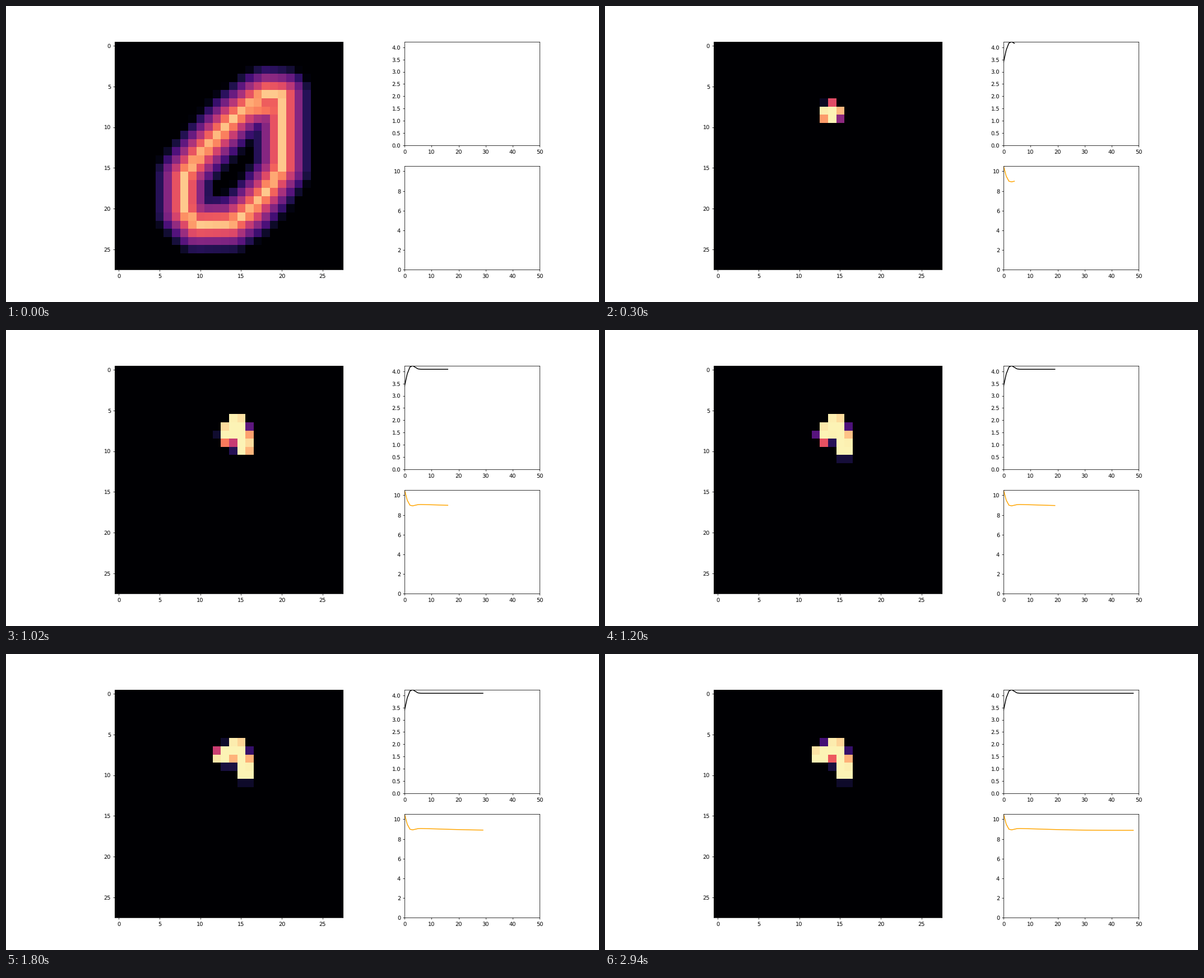
These frames come from a looping animation (1058x529 px, 3000 ms). A matplotlib script:

```python
import numpy as np
import matplotlib.pyplot as plt
from matplotlib.animation import FuncAnimation

FRAMES = 50
SIZE = 28
ROWS, COLS = np.mgrid[:SIZE, :SIZE]

# Centre lines as (column, row) key points
LOOP = [(18.2, 5.9), (20, 6.1), (20, 15), (18, 18), (16, 20.3), (13.7, 21.9),
        (9.5, 22), (8, 20.3), (8, 16), (10, 13.3), (12, 11.2), (14, 9),
        (17, 6.5), (18.2, 5.9)]
BRIDGE = [(15, 8), (20, 7.4)]

# The blob starts as a dot and is pulled out into a hook
START = np.array([13.9, 8.25])
HOOK = np.array([(12.45, 7.65), (14.4, 6.6), (14.95, 7.6), (15.5, 9.8)])
SPANS = np.array([31, 8, 12, 15])  # frames each hook point needs to arrive
DOT_FRAMES = 5


def distance(path):
    """Distance of every cell from a polyline."""
    best = np.full((SIZE, SIZE), np.inf)
    for (x, y), (x2, y2) in zip(path, path[1:]):
        dx, dy = x2 - x, y2 - y
        length2 = max(dx * dx + dy * dy, 1e-9)
        u = np.clip(((COLS - x) * dx + (ROWS - y) * dy) / length2, 0, 1)
        best = np.minimum(best, np.hypot(COLS - x - u * dx, ROWS - y - u * dy))
    return best


def digit():
    ring = 0.89 * np.clip(1 - distance(LOOP) / 3.8, 0, 1) ** 1.12
    fill = 0.8 * np.clip(1 - distance(BRIDGE) / 3, 0, 1)
    return np.maximum(ring, fill)


def blob(n):
    age = max(n - DOT_FRAMES, 0)
    pull = np.minimum(age / SPANS, 1)[:, None]
    path = START + pull * (HOOK - START)
    radius = 1.08 + 0.22 * (1 - pull[0, 0]) ** 3
    radius *= min(n / DOT_FRAMES, 1) ** 0.4
    img = 0.98 / (1 + np.exp((distance(path) - radius) / 0.09))
    return np.where(img < 0.03, 0, img)


def settle(base, start, hump):
    """A fast approach with one overshoot around step three."""
    return (base + start * np.exp(-(steps / 0.92) ** 2)
            + hump * np.exp(-((steps - 2.9) / 1.4) ** 2))


steps = np.arange(FRAMES)
rising = settle(4.08, -0.69, 0.147)
falling = settle(8.88 + 0.2 * np.exp(-(steps / 20) ** 2), 1.46, -0.15)

plt.rcParams["text.hinting"] = "none"
fig = plt.figure(figsize=(15, 7.5), dpi=70.5334)
grid = fig.add_gridspec(2, 3, top=0.8794, bottom=0.1094)
ax = fig.add_subplot(grid[:, :2])
picture = ax.imshow(digit(), cmap="magma", vmin=0, vmax=1, interpolation="nearest")


def chart(cell, top, color):
    axes = fig.add_subplot(cell)
    axes.set_xlim(0, 50)
    axes.set_ylim(0, top)
    return axes.plot([], [], color=color)[0]


upper = chart(grid[0, 2], rising.max(), "black")
lower = chart(grid[1, 2], falling.max(), "orange")


def draw(n):
    picture.set_data(blob(n) if n else digit())
    upper.set_data(steps[:n], rising[:n])
    lower.set_data(steps[:n], falling[:n])
    return picture, upper, lower


anim = FuncAnimation(fig, draw, frames=FRAMES, interval=60,
                     init_func=lambda: draw(0), repeat=True, repeat_delay=0)
plt.show()
```
